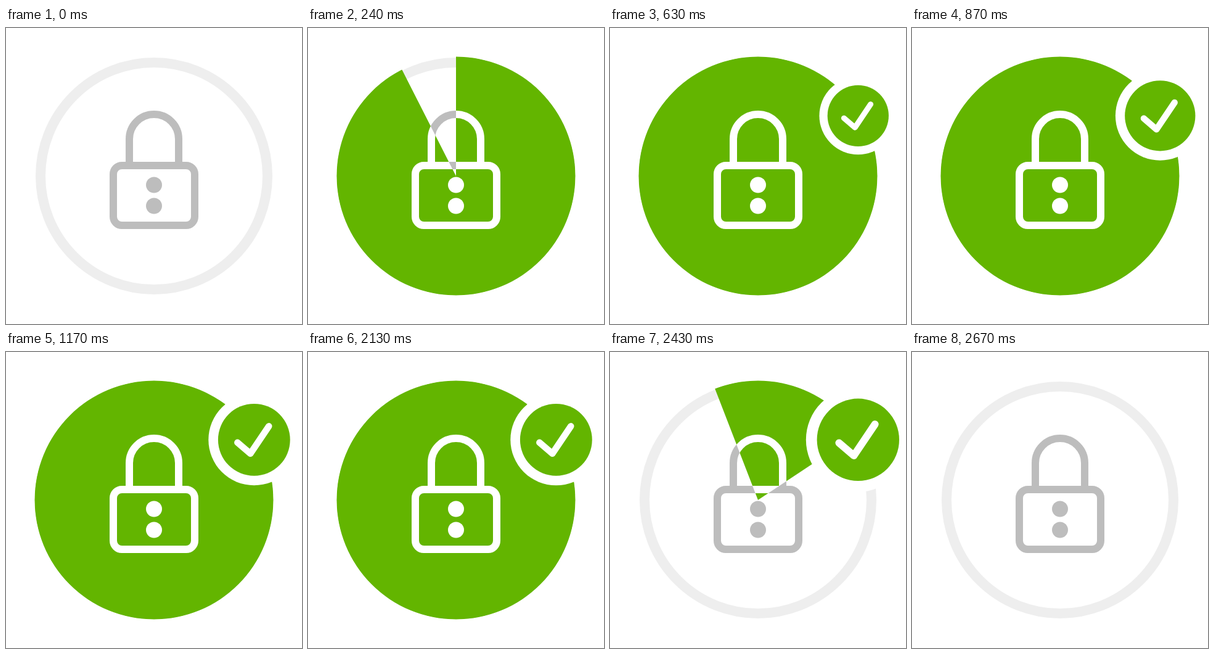
An HTML page for the animation above (3600 ms loop, 480 px wide and 480 px high).

```html
<!DOCTYPE html>
<html lang="en">
<head>
<meta charset="utf-8">
<title>Lock check</title>
<style>
  html, body { margin: 0; width: 100%; height: 100%; overflow: hidden; background: #fff; }
  svg { display: block; width: 100vw; height: 100vh; }
  .green { fill: #63b500; }
  .line { fill: none; stroke-width: 12; }
</style>
</head>
<body>
<svg viewBox="0 0 480 480">
  <defs>
    <g id="lock">
      <path class="line" stroke="currentColor" d="M200 223V180a40 40 0 0 1 80 0V223"/>
      <rect class="line" stroke="currentColor" x="174" y="223" width="132" height="97" rx="14"/>
      <circle cx="240" cy="254.5" r="13" fill="currentColor"/>
      <circle cx="240" cy="288.5" r="13" fill="currentColor"/>
    </g>
    <mask id="pie" maskUnits="userSpaceOnUse" x="0" y="0" width="480" height="480">
      <circle id="sweep" cx="240" cy="240" r="97" fill="none" stroke="#fff" stroke-width="194"
              pathLength="360" transform="rotate(-90 240 240)"/>
    </mask>
  </defs>

  <circle cx="240" cy="240" r="184" fill="none" stroke="#eee" stroke-width="16"/>
  <use href="#lock" color="#bdbdbd"/>

  <g id="fill" mask="url(#pie)">
    <circle class="green" cx="240" cy="240" r="193.5"/>
    <use href="#lock" color="#fff"/>
  </g>

  <g id="badge">
    <circle r="74" fill="#fff"/>
    <circle class="green" r="58.4"/>
    <path d="M-27 4.5L-6 22.5L24-22" fill="none" stroke="#fff" stroke-width="10.5"
          stroke-linecap="round" stroke-linejoin="round"/>
  </g>
</svg>
<script>
  const LOOP = 3600, STEP = 30;
  const [sweep, fill, badge] = ['sweep', 'fill', 'badge'].map(id => document.getElementById(id));

  const progress = (t, start, length) => Math.min(1, Math.max(0, (t - start) / length));
  const cubicOut = p => 1 - (1 - p) ** 3;
  const cubicInOut = p => p < 0.5 ? 4 * p ** 3 : 1 - 4 * (1 - p) ** 3;
  const backIn = p => p * p * (4 * p - 3);
  const elasticOut = p => p <= 0 ? 0 : p >= 1 ? 1
    : 1 - 2 ** (-10 * p) * Math.cos(p * 2 * Math.PI / 0.28);

  // Opens clockwise from the top; closes as both edges run on to 120% of a turn.
  function setSweep(t) {
    const open = cubicOut(progress(t, 0, 415));
    const close = cubicInOut(progress(t, 2122, 495));
    const from = 360 * 1.2 * close;
    const to = 360 * (open + 0.2 * close);
    const arc = to - from;
    fill.style.display = arc > 0.01 ? '' : 'none';
    sweep.setAttribute('stroke-dasharray', arc > 359.9 ? 'none' : `${arc} ${360 - arc}`);
    sweep.setAttribute('stroke-dashoffset', -from);
  }

  function setBadge(t) {
    const scale = t < 2000
      ? elasticOut(progress(t, 402, 850))
      : 1 - backIn(progress(t, 2348, 301));
    badge.style.display = scale > 0 ? '' : 'none';
    badge.setAttribute('transform', `translate(402.3 142.3) scale(${Math.max(0, scale)})`);
  }

  const begin = performance.now();
  function draw() {
    const t = Math.floor((performance.now() - begin) % LOOP / STEP) * STEP;
    setSweep(t);
    setBadge(t);
    requestAnimationFrame(draw);
  }
  draw();
</script>
</body>
</html>
```
